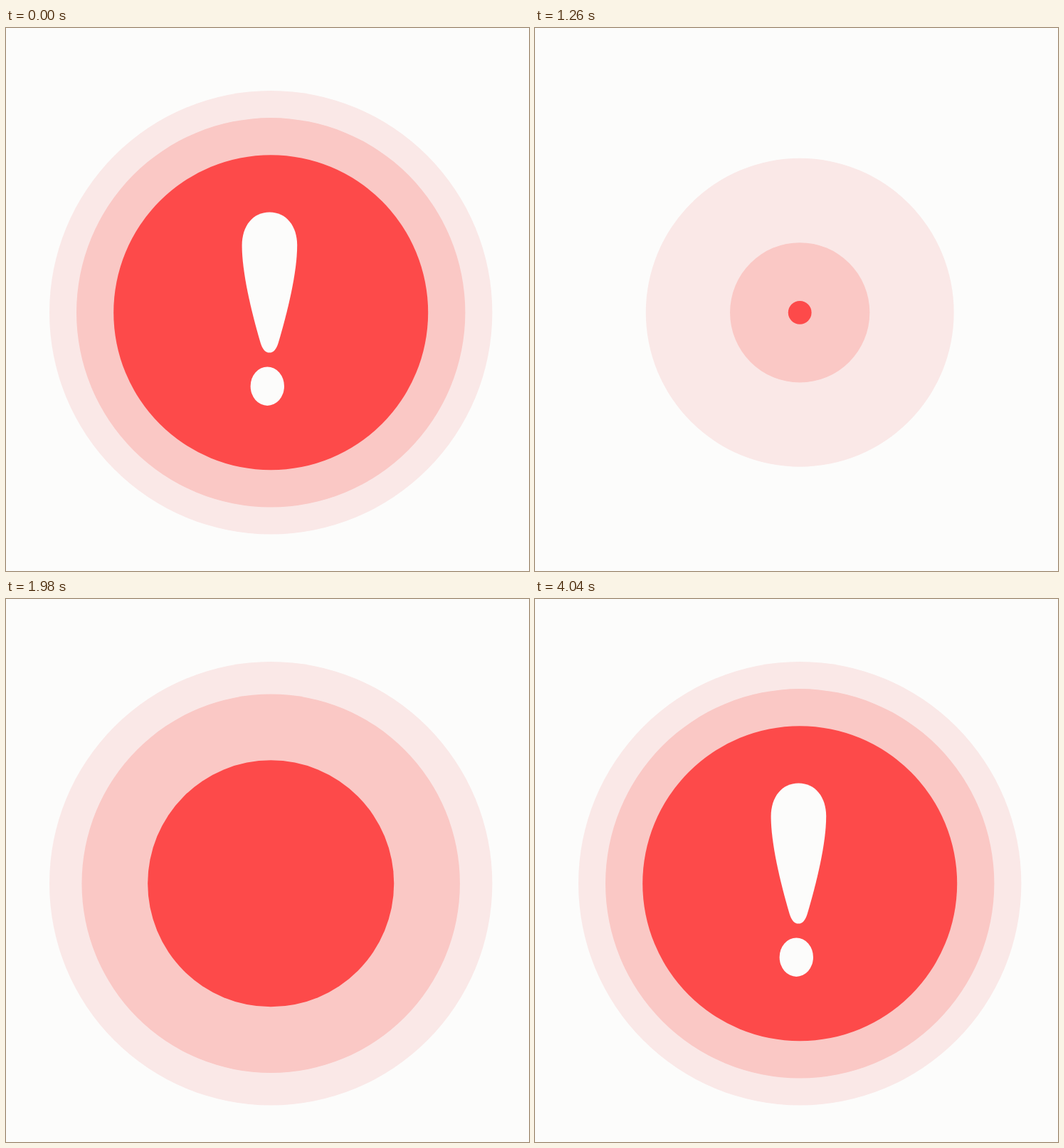
Recreate the animation shown at these times as an HTML page. Size 735 by 762 pixels, loop 5680 ms.

```html
<!DOCTYPE html>
<html lang="en">
<head>
<meta charset="utf-8">
<title>Alert</title>
<style>
  html, body { margin: 0; width: 100%; height: 100%; overflow: hidden; background: #fcfcfb; }
  svg { display: block; width: 735px; height: 762px; }
</style>
</head>
<body>
<svg viewBox="0 0 735 762">
  <g transform="translate(372.2 399.3)">
    <circle id="outer" r="311.2" fill="#fae8e7"/>
    <circle id="middle" r="273.2" fill="#fac8c5"/>
    <circle id="inner" r="221" fill="#fd4a4a"/>
  </g>
  <g fill="#fcfcfb">
    <path id="stroke" d="M370.4 258.5C394 258.5 409.2 278 409.2 305C409.2 343 396 397 382.7 442
      C379.7 451 376 455.6 370.2 455.6C364.4 455.6 360.7 451 357.7 442
      C344.5 397 331.6 343 331.6 305C331.6 278 346.8 258.5 370.4 258.5Z"/>
    <ellipse id="dot" cx="367.3" cy="502.7" rx="23.7" ry="27.2"/>
  </g>
</svg>
<script>
const LOOP = 5680;
const part = id => document.getElementById(id);

function bezier(x1, y1, x2, y2) {
  const curve = (a, b, s) => 3 * a * s * (1 - s) ** 2 + 3 * b * s * s * (1 - s) + s ** 3;
  return x => {
    if (x <= 0) return 0;
    if (x >= 1) return 1;
    let low = 0, high = 1;
    for (let i = 0; i < 24; i++) {
      const mid = (low + high) / 2;
      if (curve(x1, x2, mid) < x) low = mid; else high = mid;
    }
    return curve(y1, y2, low);
  };
}

const swell = bezier(0.55, 0, 0.43, 1);
const ease = bezier(0.25, 0.1, 0.25, 1);

const scaleAll = s => `scale(${s})`;
const scaleTall = s => `translate(0 448) scale(1 ${s}) translate(0 -448)`;
const scaleFromTip = s => `translate(367.3 454) scale(${s}) translate(-367.3 -454)`;

// start and length are counted in steps
const tracks = [
  { el: part("outer"), start: 3.5, length: 38.5, easing: swell, place: scaleAll },
  { el: part("middle"), start: 9.7, length: 38, easing: swell, place: scaleAll },
  { el: part("inner"), start: 17.2, length: 39, easing: swell, place: scaleAll },
  { el: part("stroke"), start: 42.2, length: 23.5, easing: ease, place: scaleTall },
  { el: part("dot"), start: 54.8, length: 23.5, easing: ease, place: scaleFromTip }
];

// The loop opens on the finished sign, then steps last 100, 20 and 20 ms in turn.
function stepAt(ms) {
  if (ms < 20) return Infinity;
  const rest = (ms - 20) % 140;
  return Math.floor((ms - 20) / 140) * 3 + (rest < 100 ? 0 : rest < 120 ? 1 : 2);
}

function draw() {
  const step = stepAt(performance.now() % LOOP);
  for (const { el, start, length, easing, place } of tracks) {
    const size = easing((step - start) / length);
    el.style.display = size > 0 ? "" : "none";
    el.setAttribute("transform", place(size));
  }
  requestAnimationFrame(draw);
}
draw();
</script>
</body>
</html>
```
